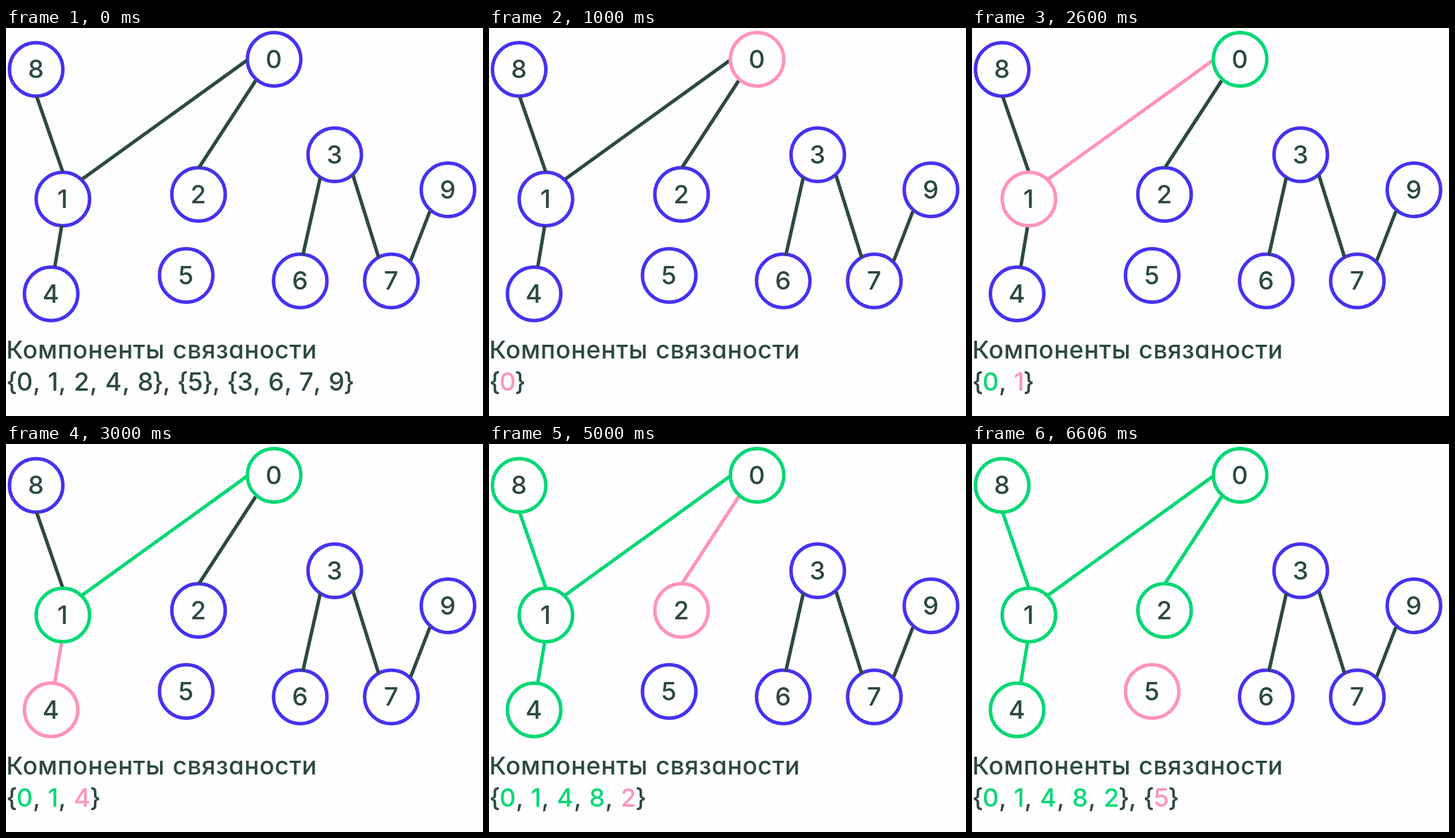
Write an HTML page that moves like this. It is 830 px wide and 675 px high and loops after 7.01 s.

```html
<!DOCTYPE html>
<html lang="ru">
<head>
<meta charset="utf-8">
<title>Компоненты связаности</title>
<style>
html, body { margin: 0; width: 100%; height: 100%; overflow: hidden; background: #fefefe; }
svg { display: block; }
text { font: 500 44px Inter, Roboto, sans-serif; font-feature-settings: "cv11"; }
.title { font-size: 43px; letter-spacing: 0.6px; }
circle { fill: none; stroke-width: 6; }
line { stroke-width: 6; }
</style>
</head>
<body>
<svg id="stage" width="830" height="675" viewBox="0 0 830 675"></svg>
<script>
const INK = '#2c4a42', BLUE = '#4632f0', PINK = '#ff94b5', GREEN = '#02d873';
const STEP = 1000, LOOP = 7010;

// Node centres, indexed by label
const nodes = [
  [466.5, 54.5], [99, 297.5], [335, 289.5], [572, 220.5], [78.5, 462.5],
  [313.5, 430.5], [512, 440], [670.5, 440], [52.5, 72], [769, 281.5]
];

// Each edge is coloured together with the node it leads to
const edges = [
  { to: 8, at: [53.5, 119.5, 98.5, 249.5] },
  { to: 1, at: [419.5, 56, 132.5, 263] },
  { to: 2, at: [434.5, 91.5, 336, 242.5] },
  { to: 4, at: [97, 343.5, 85, 415] },
  { to: 6, at: [547, 259.5, 516.5, 395.5] },
  { to: 7, at: [603.5, 255.5, 648.5, 399.5] },
  { to: 9, at: [737.5, 319, 704, 405.5] }
];

const visits = [0, 1, 4, 8, 2, 5];
const lists = [
  '{0, 1, 2, 4, 8}, {5}, {3, 6, 7, 9}', '{0}', '{0, 1}', '{0, 1, 4}',
  '{0, 1, 4, 8}', '{0, 1, 4, 8, 2}', '{0, 1, 4, 8, 2}, {5}'
];
const advance = { '{': 17, '}': 16, ',': 14, ' ': 12.5, 1: 18, 4: 30, 5: 27, 3: 27, 7: 24 };

function shade(label, step, idle) {
  const order = visits.indexOf(label) + 1;
  if (!order || order > step) return idle;
  return order === step ? PINK : GREEN;
}

const glyph = (x, y, s, fill) =>
  `<text x="${x}" y="${y}" fill="${fill}" text-anchor="middle">${s}</text>`;

function ring(label, step) {
  const [x, y] = nodes[label];
  return `<circle cx="${x}" cy="${y}" r="46.5" stroke="${shade(label, step, BLUE)}"/>` +
    glyph(x - 0.5, y + 15, label, INK);
}

function edge({ to, at: [x1, y1, x2, y2] }, step) {
  return `<line x1="${x1}" y1="${y1}" x2="${x2}" y2="${y2}" stroke="${shade(to, step, INK)}"/>`;
}

function list(step) {
  let x = 1.5, out = '';
  for (const c of lists[step]) {
    const w = advance[c] || 28;
    const color = /\d/.test(c) ? shade(+c, step, INK) : INK;
    if (c !== ' ') out += glyph(x + w / 2, 630.5, c, color);
    x += w;
  }
  return out;
}

function picture(step) {
  const labels = nodes.map((_, i) => i);
  const seen = i => shade(i, step, '') !== '';
  const rings = set => set.map(i => ring(i, step)).join('');
  return rings(labels.filter(i => !seen(i))) +
    edges.map(e => edge(e, step)).join('') +
    rings(labels.filter(seen)) +
    `<text class="title" y="575" fill="${INK}"><tspan x="0.5">Компоненты</tspan> <tspan x="290">связаности</tspan></text>` +
    list(step);
}

const stage = document.getElementById('stage');
let shown = -1;

function draw(ms) {
  const step = Math.min(lists.length - 1, Math.floor((ms % LOOP) / STEP));
  if (step !== shown) {
    stage.innerHTML = picture(step);
    shown = step;
  }
}

const start = performance.now();
function tick() {
  draw(performance.now() - start);
  requestAnimationFrame(tick);
}
tick();
</script>
</body>
</html>
```
